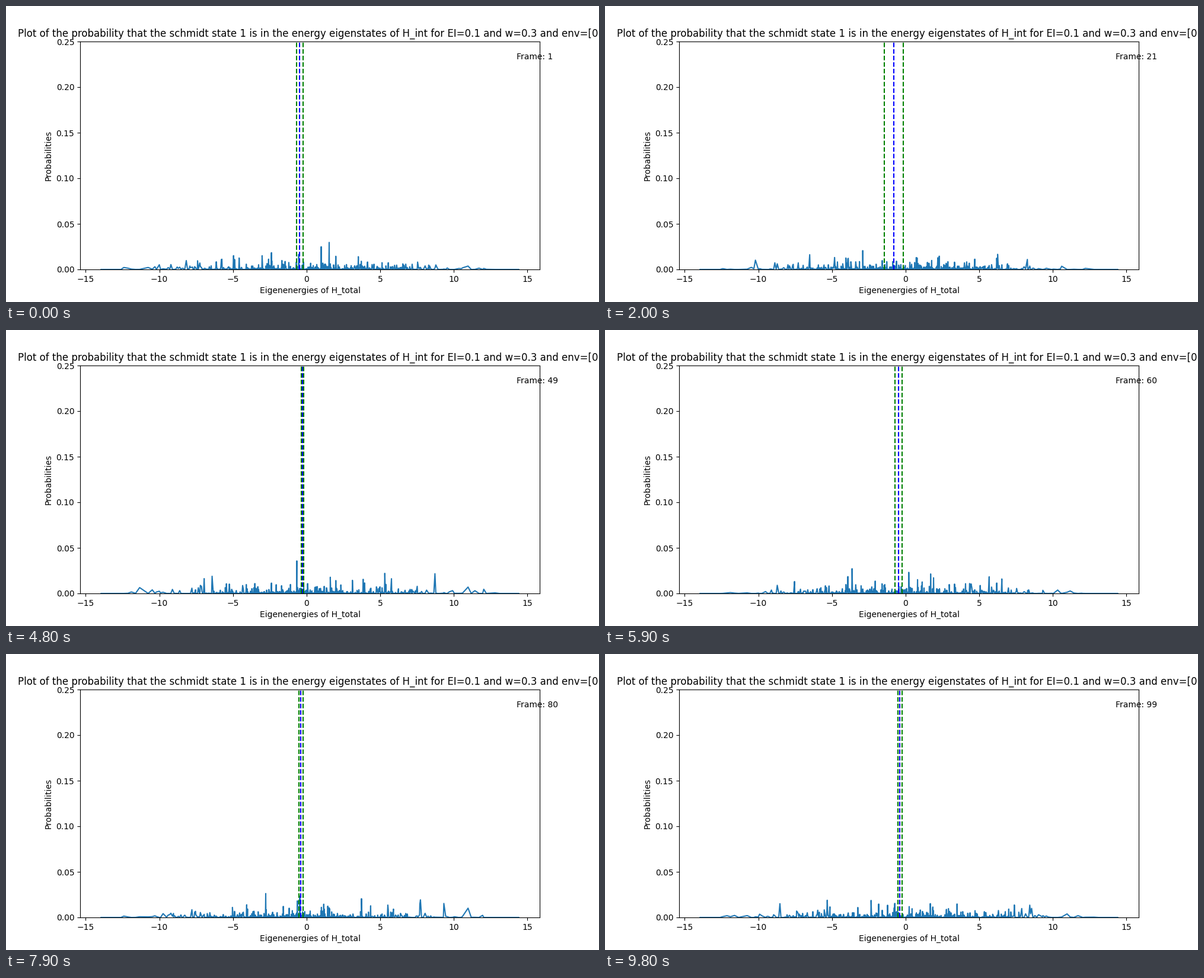
Recreate the animation shown at these times as a matplotlib script. Size 1000 by 500 pixels, loop 9900 ms.

```python
import numpy as np
import matplotlib.pyplot as plt
from matplotlib.animation import FuncAnimation

FRAMES = 99
INTERVAL = 100
E_MIN, E_MAX = -13.958, 14.411
LEVELS = 720
MODES = 8

# Key points of the mean energy over the loop
KEY_FRAMES = np.array([0, 20, 35, 48, 71, 87, 98])
KEY_MEANS = np.array([-0.463, -0.804, -0.603, -0.282, -0.708, -0.115, -0.383])
KEY_SLOPES = np.gradient(KEY_MEANS, KEY_FRAMES)

rng = np.random.default_rng(11)


def build_levels():
    """Bell-shaped spectrum; thinning a sorted sample keeps levels apart."""
    sample = np.sort(rng.normal(0, 4.9, 4 * LEVELS))[::4]
    inner = sample[(sample > -12.5) & (sample < 12.9)]
    return np.concatenate([[E_MIN, -12.6], inner, [13.1, E_MAX]])


levels = build_levels()
weight = np.clip(1 - (np.abs(levels) / 13.1) ** 8, 0, 1)
weight[[0, 1, -2, -1]] = 0
freqs = rng.normal(0, 0.35, (MODES, levels.size))
phases = rng.uniform(0, 2 * np.pi, (MODES, levels.size))


def probabilities(frame):
    """Drifting random amplitudes, raised to a power so that few levels dominate."""
    amplitude = np.cos(freqs * frame + phases).sum(axis=0)
    prob = weight * np.abs(amplitude) ** 3
    return prob / prob.sum()


def mean_energy(frame):
    """Cubic Hermite curve through the key points."""
    k = np.searchsorted(KEY_FRAMES[1:-1], frame, side="right")
    t0, t1 = KEY_FRAMES[k:k + 2]
    v0, v1 = KEY_MEANS[k:k + 2]
    s0, s1 = KEY_SLOPES[k:k + 2] * (t1 - t0)
    u = (frame - t0) / (t1 - t0)
    return ((1 + 2 * u) * (1 - u) ** 2 * v0 + u * (1 - u) ** 2 * s0
            + u * u * (3 - 2 * u) * v1 + u * u * (u - 1) * s1)


plt.rcParams["font.family"] = "DejaVu Sans"
fig, ax = plt.subplots(figsize=(10, 5), dpi=100)
margin = 0.05 * (E_MAX - E_MIN)
ax.set_xlim(E_MIN - margin, E_MAX + margin)
ax.set_ylim(0, 0.25)
ax.set_xlabel("Eigenenergies of H_total")
ax.set_ylabel("Probabilities")
ax.set_title("Plot of the probability that the schmidt state 1 is in the energy "
             "eigenstates of H_int for EI=0.1 and w=0.3 and env=[0]")

spectrum, = ax.plot(levels, np.zeros_like(levels), color="tab:blue")
mean_line = ax.axvline(0, color="blue", linestyle="--")
low_line = ax.axvline(0, color="green", linestyle="--")
high_line = ax.axvline(0, color="green", linestyle="--")
counter = ax.text(0.95, 0.95, "", transform=ax.transAxes, va="top")


def update(frame):
    mean = mean_energy(frame)
    spread = mean ** 2
    spectrum.set_ydata(probabilities(frame))
    for line, x in ((mean_line, mean), (low_line, mean - spread),
                    (high_line, mean + spread)):
        line.set_xdata([x, x])
    counter.set_text(f"Frame: {frame + 1}")
    return spectrum, mean_line, low_line, high_line, counter


anim = FuncAnimation(fig, update, frames=FRAMES, interval=INTERVAL,
                     repeat=True, repeat_delay=0)
plt.show()
```
